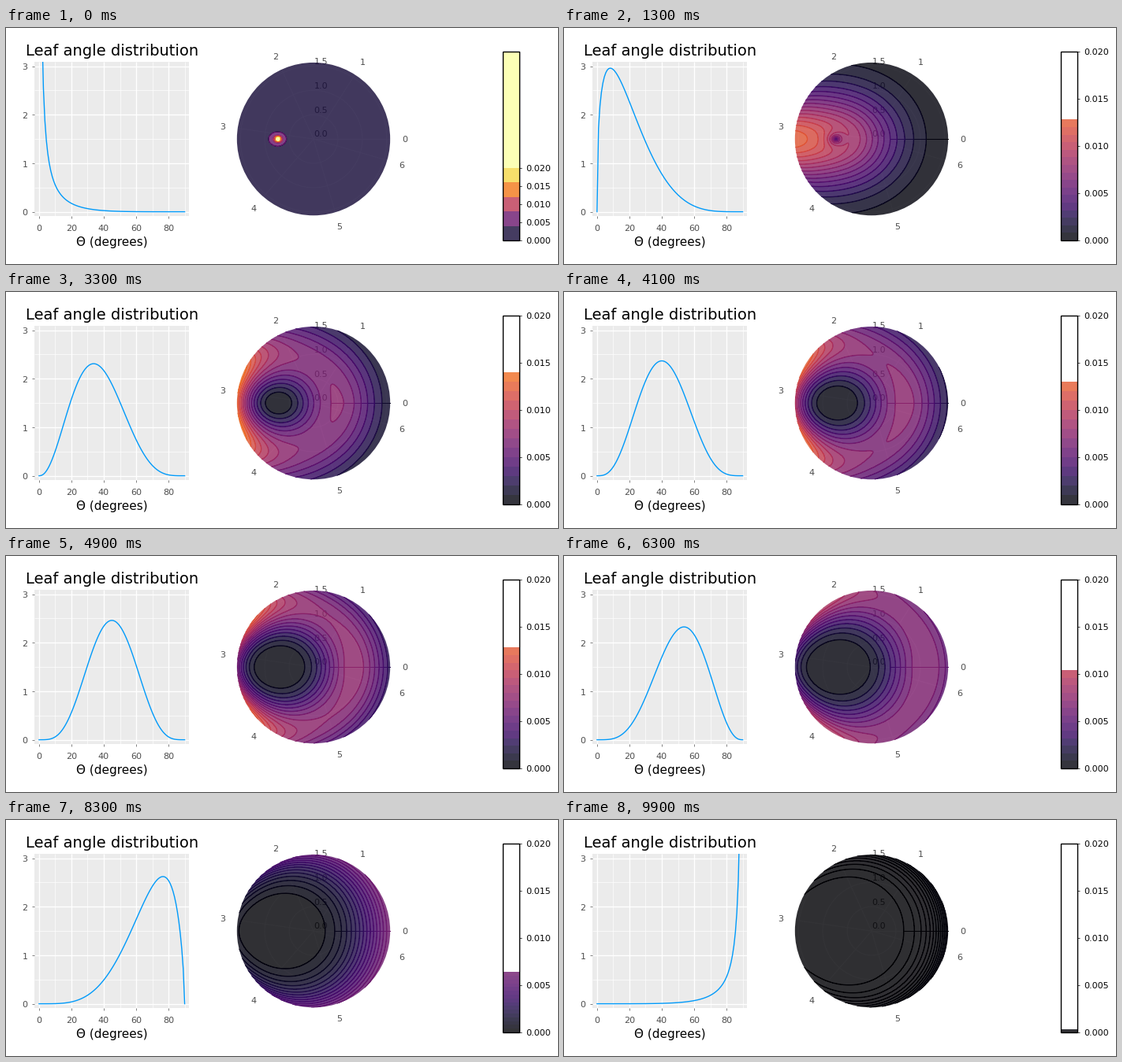
A matplotlib script for the animation above (10 s loop, 700 px wide and 300 px high).

```python
import math

import matplotlib.pyplot as plt
import numpy as np
from matplotlib.animation import FuncAnimation
from matplotlib.colors import Normalize
from matplotlib.patches import Circle, Rectangle

W, H, DPI = 700, 300, 100
FRAMES, INTERVAL = 100, 100
GREY, PANEL = "#4d4d4d", "#ebebeb"
CMAP, NORM, ALPHA = plt.get_cmap("inferno"), Normalize(0, 0.02), 0.8

# Optics: refractive index and leaf roughness
N_LEAF, KAPPA = 1.5, 0.2
# Zenith angles at Gauss nodes in cos(theta); light comes in along one of them
MU = (np.polynomial.legendre.leggauss(180)[0] + 1) / 2
THETA = np.arccos(MU[::-1])
PHI = np.linspace(0, 2 * math.pi, 200)
T_IN = math.acos(MU[119])

plt.rcParams["font.family"] = "DejaVu Sans"
fig = plt.figure(figsize=(W / DPI, H / DPI), dpi=DPI, facecolor="white")
ax = fig.add_axes([0, 0, 1, 1])
ax.set_xlim(0, W)
ax.set_ylim(H, 0)
ax.axis("off")


def px(deg):
    return 41.9 + 2.052 * deg


def py(density):
    return 233.6 - 61.67 * density


# Panel geometry in pixels, y pointing down
LEFT, RIGHT, TOP, BOTTOM = px(-2.7), px(92.7), py(3.09), py(-0.09)
CX, CY, RAD = 390.0, 141.1, 61.85
EDGE = RAD * math.pi / 2
BAR_X, BAR_W, BAR_TOP, BAR_BOTTOM = 630, 21, 30, 270
TICK = 3


def line(xs, ys, color, width, z=1, **kw):
    return ax.plot(xs, ys, color=color, lw=width, zorder=z, **kw)[0]


def label(x, y, text, ha="center", color=GREY, z=3):
    """Small label whose digits are centred on y."""
    return ax.text(x, y + 4, text, ha=ha, va="baseline", size=8,
                   color=color, zorder=z)


def beta_pdf(x, a, b):
    norm = math.gamma(a) * math.gamma(b) / math.gamma(a + b)
    with np.errstate(divide="ignore", invalid="ignore"):
        y = x ** (a - 1) * (1 - x) ** (b - 1) / norm
    return np.where(np.isfinite(y), y, np.nan)


def specular_terms():
    """Leaf normal (0..1 of 90 degrees) and the angle-only reflection factor."""
    t, p = np.meshgrid(THETA, PHI, indexing="ij")
    dot = (math.cos(T_IN) * np.cos(t)
           + math.sin(T_IN) * np.sin(t) * np.cos(p))
    c = np.sqrt((1 + np.clip(dot, -1, 1)) / 2)
    s2 = 1 - c ** 2
    normal = np.arccos(np.clip((math.cos(T_IN) + np.cos(t)) / (2 * c), -1, 1))
    root = np.sqrt(N_LEAF ** 2 - s2)
    rs = ((c - root) / (c + root)) ** 2
    rp = ((root - N_LEAF ** 2 * c) / (root + N_LEAF ** 2 * c)) ** 2
    rough = np.exp(-KAPPA * np.sqrt(s2) / c)
    return 2 * normal / math.pi, (rs + rp) / 2 * rough / (4 * math.pi)


def draw_left_panel():
    ax.add_patch(Rectangle((LEFT, TOP), RIGHT - LEFT, BOTTOM - TOP,
                           fc=PANEL, ec="none", zorder=0))
    for d in range(0, 91, 10):
        line([px(d)] * 2, [TOP, BOTTOM], "white", 0.5 if d % 20 else 1,
             solid_capstyle="butt")
    for k in range(7):
        line([LEFT, RIGHT], [py(k / 2)] * 2, "white", 0.5 if k % 2 else 1,
             solid_capstyle="butt")
    for d in range(0, 81, 20):
        line([px(d)] * 2, [BOTTOM, BOTTOM + TICK], GREY, 0.5,
             solid_capstyle="butt")
        label(px(d), 254, str(d))
    for v in range(4):
        line([LEFT - TICK, LEFT], [py(v)] * 2, GREY, 0.5,
             solid_capstyle="butt")
        label(LEFT - 9, py(v) + 0.6, str(v), "right")
    mid = (LEFT + RIGHT) / 2
    ax.text(mid, 35, "Leaf angle distribution", ha="center", size=14)
    ax.text(mid, 277, "Θ (degrees)", ha="center", size=11)


def draw_polar_base():
    for a in range(7):
        dx, dy = math.cos(a), -math.sin(a)
        line([CX, CX + EDGE * dx], [CY, CY + EDGE * dy], "white", 0.8)
        label(CX + 116 * dx, CY + 116 * dy, str(a))
    for r in (0, 0.5, 1, 1.5):
        ax.add_patch(Circle((CX, CY), RAD * r, fc="none", ec="white",
                            lw=0.8, zorder=1))
        label(CX + 0.5, CY - RAD * r - 6.6, f"{r:.1f}", "left", z=1.2)


disc = ax.add_patch(Circle((CX, CY), EDGE, fc=PANEL, ec="none", zorder=0))
draw_left_panel()
draw_polar_base()

NORMAL, FACTOR = specular_terms()
# The outer rim overshoots and is trimmed smoothly by the disc
RADII = RAD * THETA
RADII[-1] += 1
GX = CX + np.outer(RADII, np.cos(PHI))
GY = CY - np.outer(RADII, np.sin(PHI))
XS = np.linspace(0, 1, 101)

curve = line(px(90 * XS), py(0 * XS), "#009afa", 1, z=2)
curve.set_clip_path(Rectangle((LEFT, TOP), RIGHT - LEFT, BOTTOM - TOP,
                              transform=ax.transData))

ax.add_patch(Rectangle((BAR_X, BAR_TOP), BAR_W, BAR_BOTTOM - BAR_TOP,
                       fc="none", ec="black", lw=1, zorder=4))
bar_ticks = []
for k in range(5):
    v = 0.005 * k
    mark = line([BAR_X + BAR_W, BAR_X + BAR_W + TICK], [0, 0], "black", 0.5,
                solid_capstyle="butt")
    text = label(BAR_X + BAR_W + 8, 0, f"{v:.3f}", "left", "black")
    bar_ticks.append((v, mark, text))

live = []


def draw_seam(z, step):
    """Doubled overlap where the azimuth range closes on itself."""
    bands = np.floor(z / step)
    cuts = np.flatnonzero((np.diff(bands) != 0) & (THETA[1:] > 0.32))
    if cuts.size:
        k = cuts[0]
        live.append(ax.pcolormesh(CX + RADII[k:], [141, 142], z[None, k + 1:],
                                  cmap=CMAP, norm=NORM, zorder=1.6))


def draw_colorbar(levels):
    top = max(0.02, levels[-1])

    def bar_y(v):
        return BAR_BOTTOM - (BAR_BOTTOM - BAR_TOP) * v / top

    for lo, hi in zip(levels[:-1], levels[1:]):
        live.append(ax.add_patch(Rectangle(
            (BAR_X, bar_y(hi)), BAR_W, bar_y(lo) - bar_y(hi), ec="none",
            fc=CMAP(NORM((lo + hi) / 2)), alpha=ALPHA, aa=False, zorder=2)))
    for v, mark, text in bar_ticks:
        mark.set_ydata([bar_y(v)] * 2)
        text.set_y(bar_y(v) + 4.2)


def draw(i):
    while live:
        live.pop().remove()
    # One shape parameter rises to 5, then the other falls from 5
    a = min(i + 1, 50) / 10
    b = min(FRAMES - i, 50) / 10
    curve.set_ydata(py(beta_pdf(XS, a, b)))

    z = beta_pdf(NORMAL, a, b) * FACTOR
    fill = ax.contourf(GX, GY, z, 15, cmap=CMAP, norm=NORM, alpha=ALPHA,
                       zorder=2)
    rings = ax.contour(GX, GY, z, levels=fill.levels, cmap=CMAP, norm=NORM,
                       linewidths=1, zorder=1.5)
    for part in (fill, rings):
        part.set_clip_path(disc)
        live.append(part)
    draw_seam(z[:, 0], fill.levels[1] - fill.levels[0])
    draw_colorbar(fill.levels)
    return []


anim = FuncAnimation(fig, draw, frames=FRAMES, interval=INTERVAL,
                     init_func=lambda: draw(0), repeat=True, repeat_delay=0,
                     blit=False)
plt.show()
```
